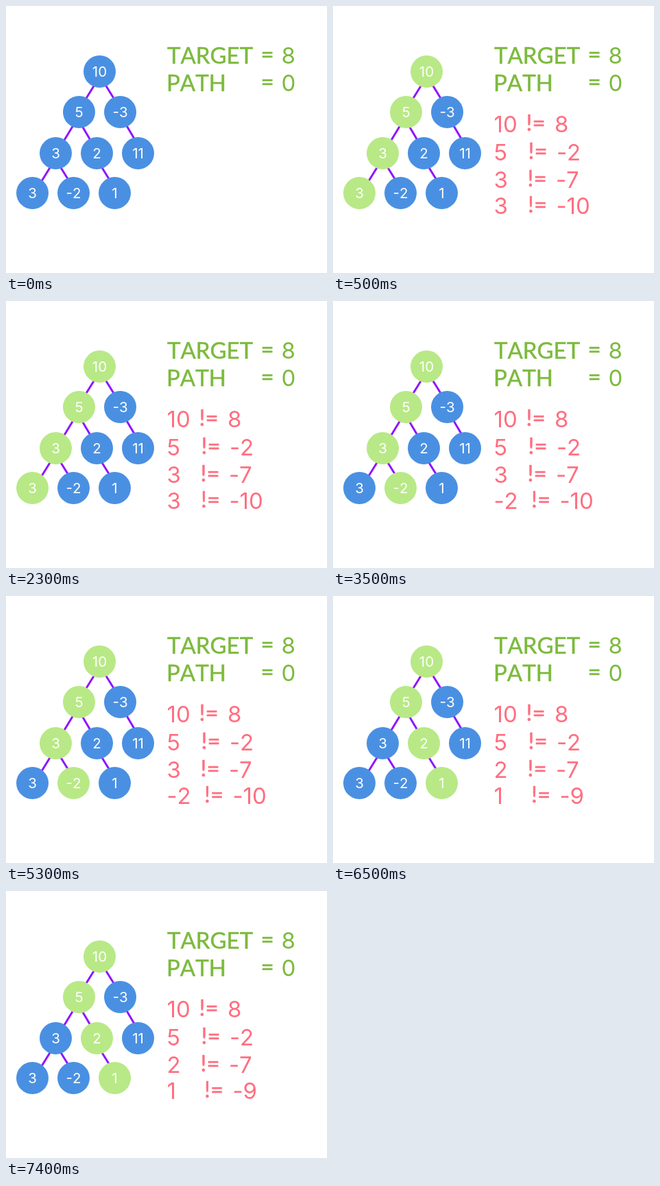
An HTML page with a canvas for the animation above (8 s loop, 468x389 px).

```html
<!DOCTYPE html>
<html lang="en">
<head>
<meta charset="utf-8">
<title>Tree path sum</title>
<style>
  html, body { margin: 0; width: 100%; height: 100%; overflow: hidden; background: #fff; }
  canvas { display: block; }
</style>
</head>
<body>
<canvas id="stage" width="468" height="389"></canvas>
<script>
const ctx = document.getElementById('stage').getContext('2d');
const LOOP = 8000;
const RADIUS = 23.5;
const LETTERS = '33px Lato, sans-serif';
const DIGITS = '33px Inter, sans-serif';
const LABEL = '20.5px Inter, sans-serif';
const COLORS = {
  idle: '#4a90e2', visited: '#b8e986', edge: '#9013fe',
  title: '#7cba3d', check: '#ff6f80', label: '#ffffff'
};

// label, center x, center y
const nodes = [
  ['10', 136.5, 95.5],
  ['5', 106.5, 154.5], ['-3', 166.5, 154.5],
  ['3', 72.5, 214.5], ['2', 132.5, 214.5], ['11', 192.5, 214.5],
  ['3', 38.5, 272.5], ['-2', 98.5, 272.5], ['1', 158.5, 272.5]
];

const edges = [
  [129, 115, 116, 136], [145, 115, 158, 136],
  [98, 174, 84, 197], [111, 175, 124, 197], [175, 173, 188, 195],
  [65, 234, 52, 255], [79, 234, 92, 255], [139, 234, 152, 255]
];

// checks: value, remaining sum, x offset of the comparison
const first = ['10', '8', -2];
const second = ['5', '-2', 1];
const steps = [
  { start: 0, path: [], checks: [] },
  { start: 500, path: [0, 1, 3, 6],
    checks: [first, second, ['3', '-7', 0], ['3', '-10', 0.5]] },
  { start: 3500, path: [0, 1, 3, 7],
    checks: [first, second, ['3', '-7', 0], ['-2', '-10', 5.5]] },
  { start: 6500, path: [0, 1, 4, 8],
    checks: [first, second, ['2', '-7', 0], ['1', '-9', 5.5]] }
];
const checkBaselines = [184, 225, 265, 303];

// Letters and operators get a thin rounded outline to soften their ends.
function drawLetters(text, x, y) {
  ctx.font = LETTERS;
  ctx.strokeStyle = ctx.fillStyle;
  ctx.lineWidth = 0.5;
  ctx.fillText(text, x, y);
  ctx.strokeText(text, x, y);
}

function drawOperator(text, x, y) {
  drawLetters(text, x, y - 2.5);
}

function drawNumber(text, x, y) {
  ctx.font = DIGITS;
  if (text[0] === '-') {
    ctx.fillText('-', x, y);
    ctx.fillText(text.slice(1), x + 15, y);
  } else {
    ctx.fillText(text, x, y);
  }
}

function drawTree(path) {
  ctx.strokeStyle = COLORS.edge;
  ctx.lineWidth = 3;
  ctx.beginPath();
  for (const [x1, y1, x2, y2] of edges) {
    ctx.moveTo(x1, y1);
    ctx.lineTo(x2, y2);
  }
  ctx.stroke();

  ctx.font = LABEL;
  ctx.textAlign = 'center';
  nodes.forEach(([label, x, y], i) => {
    ctx.fillStyle = path.includes(i) ? COLORS.visited : COLORS.idle;
    ctx.beginPath();
    ctx.arc(x, y, RADIUS, 0, Math.PI * 2);
    ctx.fill();
    ctx.fillStyle = COLORS.label;
    ctx.fillText(label, x, y + 7.5);
  });
  ctx.textAlign = 'left';
}

function drawTitle() {
  ctx.fillStyle = COLORS.title;
  [['TARGET', '8', 235, 84], ['PATH', '0', 234, 124]].forEach(([name, value, x, y]) => {
    drawLetters(name, x, y);
    drawOperator('=', 371.5, y);
    drawNumber(value, 401.5, y);
  });
}

function drawChecks(checks) {
  ctx.fillStyle = COLORS.check;
  checks.forEach(([value, rest, shift], i) => {
    const y = checkBaselines[i];
    drawNumber(value, 234.5, y);
    drawOperator('!=', 283.5 + shift, y);
    drawNumber(rest, 325 + shift, y);
  });
}

function render(now) {
  const time = now % LOOP;
  const step = steps.filter(s => s.start <= time).pop();
  ctx.fillStyle = '#fff';
  ctx.fillRect(0, 0, 468, 389);
  drawTree(step.path);
  drawTitle();
  drawChecks(step.checks);
}

function tick() {
  render(performance.now());
  requestAnimationFrame(tick);
}

ctx.fontKerning = 'none';
ctx.lineJoin = 'round';
tick();
</script>
</body>
</html>
```
